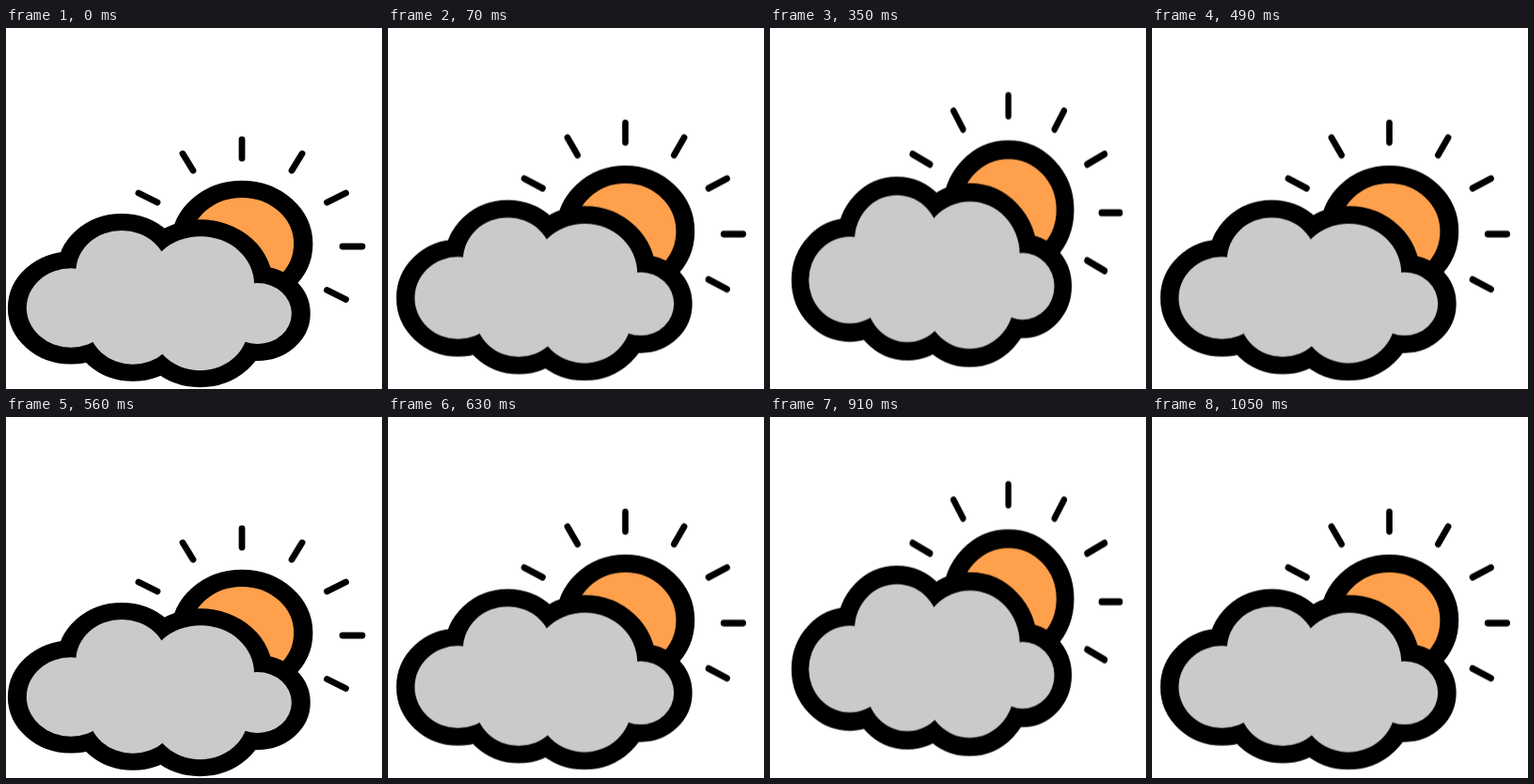
An HTML page for the animation above (1120 ms loop, 400 by 385 pixels).

```html
<!DOCTYPE html>
<html lang="en">
<head>
<meta charset="utf-8">
<title>Bouncing sun and cloud</title>
<style>
  html, body {
    margin: 0;
    width: 100%;
    height: 100%;
    overflow: hidden;
    background: #fff;
  }
  svg {
    display: block;
    width: 400px;
    height: 385px;
  }
  .bounce {
    transform-origin: 0 383px;
    animation: bounce 560ms step-end infinite;
  }
  .rays {
    fill: none;
    stroke: #000;
    stroke-width: 6.8;
    stroke-linecap: round;
  }
  .sun {
    fill: #ffa04c;
    stroke: #000;
    stroke-width: 19.2;
  }
  .outline {
    stroke: #000;
    stroke-width: 37.8;
  }
  .fill {
    fill: #cacaca;
  }

  /* The shift is linear, the vertical stretch follows a sine. */
  @keyframes bounce {
    0%, 100%     { transform: none; }
    12.5%, 87.5% { transform: translate(7px, -7.2px) scale(.978, 1.04); }
    25%, 75%     { transform: translate(14px, -14.3px) scale(.953, 1.074); }
    37.5%, 62.5% { transform: translate(21px, -21.5px) scale(.9265, 1.097); }
    50%          { transform: translate(28px, -28.7px) scale(.9, 1.108); }
  }
</style>
</head>
<body>
<svg viewBox="0 0 400 385">
  <defs>
    <g id="cloud">
      <circle cx="65.3" cy="315.5" r="44.6"/>
      <circle cx="116.5" cy="274.3" r="46"/>
      <circle cx="196" cy="288.9" r="54"/>
      <circle cx="253.3" cy="321.9" r="34.4"/>
      <circle cx="195.5" cy="337.8" r="48.3"/>
      <circle cx="127.8" cy="334.8" r="44.5"/>
    </g>
  </defs>
  <g class="bounce">
    <path class="rays" d="M141 176l20 10M188 134l11 18M251 119v20M315 134l-11 18M361.5 176l-20 10M358 233h21M341.5 279.5l20 10"/>
    <!-- Resting pose is squashed, so round shapes are drawn in a flattened space. -->
    <g transform="scale(1.056 .946)">
      <circle class="sun" cx="237.7" cy="243.4" r="61.8"/>
      <use class="outline" href="#cloud"/>
      <use class="fill" href="#cloud"/>
    </g>
  </g>
</svg>
</body>
</html>
```
